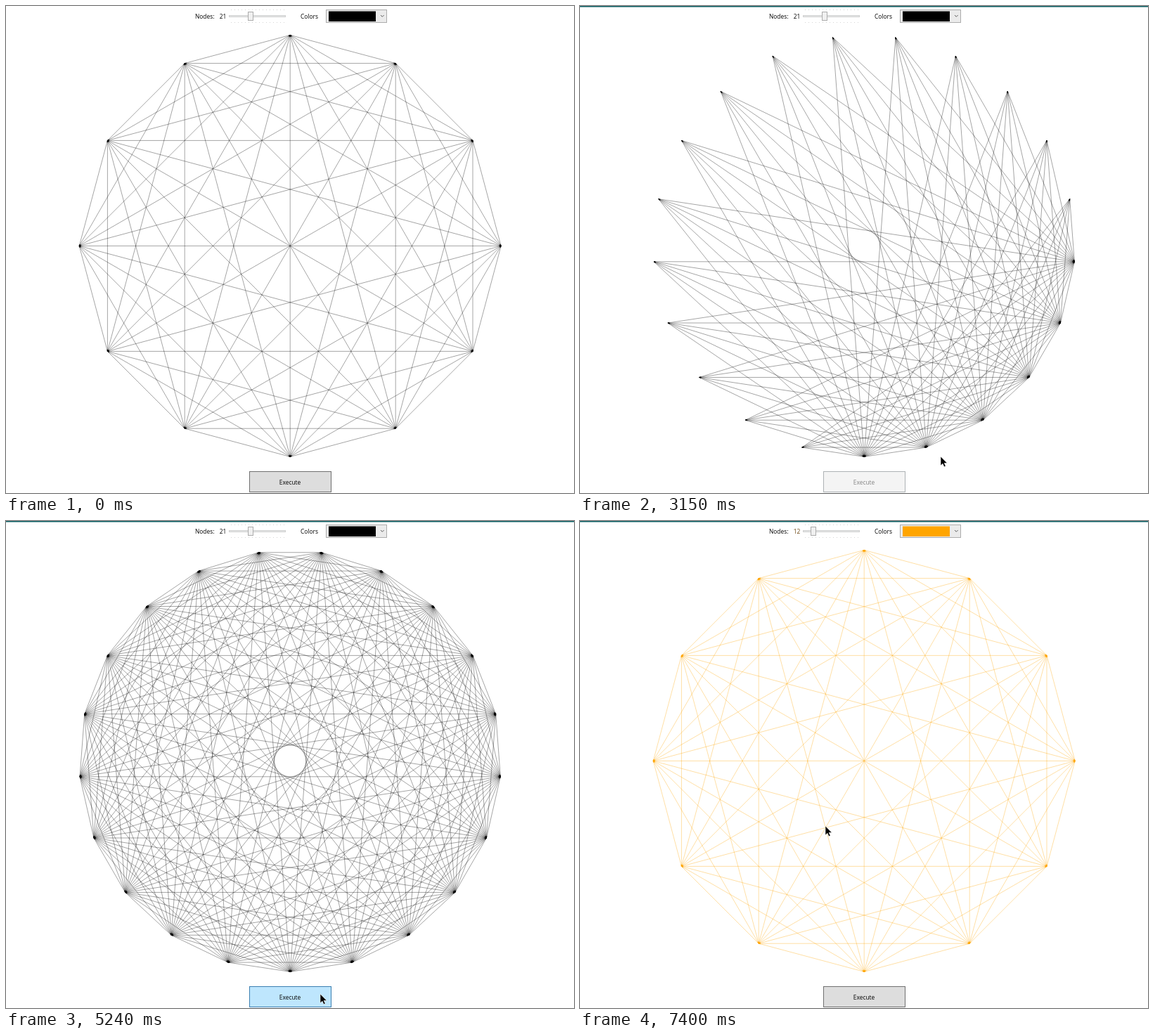
Recreate the animation shown at these times as an HTML page with a canvas. Size 808 by 693 pixels, loop 7570 ms.

```html
<!DOCTYPE html>
<html lang="en">
<head>
<meta charset="utf-8">
<title>Node graph</title>
<style>
html, body { margin: 0; width: 100%; height: 100%; overflow: hidden; background: #fff; }
canvas, svg { position: absolute; left: 0; top: 0; }
text { font: 8.4px "Open Sans", "Noto Sans", sans-serif; }
</style>
</head>
<body>
<canvas id="graph" width="808" height="693"></canvas>
<svg width="808" height="693" viewBox="0 0 808 693">
  <rect id="bar" width="808" height="1.5" fill="#0b5c61"/>
  <text x="269" y="18">Nodes:</text>
  <text id="count" x="303.7" y="18"></text>
  <path d="M320 5.5H396M320 23.5H396" stroke="#d4d4d4" stroke-dasharray="1 4"/>
  <rect x="317.5" y="13.5" width="80" height="2" fill="#e7eaea" stroke="#d0d0d0"/>
  <rect id="thumb" y="8.5" width="7" height="12" fill="#f0f0f0" stroke="#acacac"/>
  <text x="419" y="18">Colors</text>
  <rect x="455.5" y="5.5" width="86" height="18" fill="#ebebeb" stroke="#acacac"/>
  <rect id="swatch" x="459" y="7.5" width="67" height="14.5"/>
  <path d="M533 13l2.3 2.3l2.3-2.3" fill="none" stroke="#606060"/>
  <rect id="button" x="346.5" y="662.5" width="116" height="29"/>
  <text id="label" x="404" y="680.5" text-anchor="middle">Execute</text>
  <path id="cursor" d="M0 0V13L3 10.3L5 14.8L7.2 13.8L5.2 9.5H9.3Z" stroke="#fff" stroke-width=".6"/>
</svg>
<script>
const LOOP = 7570, CUT = 5700, ENTER = 230;
const RUN1 = { n: 21, color: '#000', start: 1380, end: 5240 };
const RUN2 = { n: 12, color: '#ffa500', start: 6050, end: 7400 };
const CX = 404.2, CY = 341.4, R = 300;
const $ = id => document.getElementById(id);
const ctx = $('graph').getContext('2d');

// Pointer moves: start, duration, target x, target y
const origin = [731, 413];
const moves = [
  [ENTER, 690, 258, 636],
  [920, 380, 382, 677],
  [2300, 220, 513, 641],
  [3230, 500, 447, 673],
  [6060, 340, 349, 434]
];

// background, border, text
const looks = {
  normal: ['#ddd', '#707070', '#000'],
  hover: ['#bee6fd', '#3c7fb1', '#000'],
  pressed: ['#c4e5f6', '#2c628b', '#000'],
  disabled: ['#f4f4f4', '#adb2b5', '#838383']
};

const clamp = v => Math.min(1, Math.max(0, v));
const smooth = p => p * p * (3 - 2 * p);

function pointerAt(t) {
  let [x, y] = origin;
  for (const [start, time, toX, toY] of moves) {
    const p = smooth(clamp((t - start) / time));
    x += (toX - x) * p;
    y += (toY - y) * p;
  }
  return [x, y];
}

// Drawing slows down a little as the graph fills
function edgesDrawn({ n, start, end }, t) {
  const p = clamp((t - start) / (end - start));
  return Math.floor(n * (n - 1) / 2 * p * (1.18 - 0.18 * p) + 0.01);
}

function line(x1, y1, x2, y2, width) {
  ctx.lineWidth = width;
  ctx.beginPath();
  ctx.moveTo(x1, y1);
  ctx.lineTo(x2, y2);
  ctx.stroke();
}

// Each edge is a hairline with a short, slightly heavier tip at both ends
function drawEdge(x1, y1, x2, y2) {
  const k = 2.6 / Math.hypot(x2 - x1, y2 - y1);
  const dx = (x2 - x1) * k, dy = (y2 - y1) * k;
  line(x1, y1, x2, y2, 0.36);
  line(x1, y1, x1 + dx, y1 + dy, 0.7);
  line(x2, y2, x2 - dx, y2 - dy, 0.7);
}

function drawGraph(n, count, color) {
  const node = i => {
    const a = 2 * Math.PI * i / n;
    return [CX + R * Math.sin(a), CY + R * Math.cos(a)];
  };
  ctx.clearRect(0, 0, 808, 693);
  ctx.strokeStyle = color;
  for (let i = 0; i < n; i++) {
    for (let j = i + 1; j < n && count > 0; j++, count--) drawEdge(...node(i), ...node(j));
  }
}

function buttonState(t) {
  for (const { start, end } of [RUN1, RUN2]) {
    if (t >= start && t < end) return 'disabled';
    if (t >= start - 80 && t < start) return 'pressed';
  }
  const [x, y] = pointerAt(t);
  return x > 346 && x < 463 && y > 662 ? 'hover' : 'normal';
}

function render(t) {
  const settings = t < CUT ? RUN1 : RUN2;
  if (t < RUN1.start) drawGraph(12, 66, '#000');
  else {
    const run = t < RUN2.start ? RUN1 : RUN2;
    drawGraph(run.n, edgesDrawn(run, t), run.color);
  }

  const [fill, stroke, ink] = looks[buttonState(t)];
  $('button').setAttribute('fill', fill);
  $('button').setAttribute('stroke', stroke);
  $('label').setAttribute('fill', ink);

  $('bar').style.display = t < RUN1.start - 80 ? 'none' : '';
  $('count').textContent = settings.n;
  $('count').setAttribute('fill', t < CUT ? '#000' : '#6b4510');
  $('thumb').setAttribute('x', Math.round(308 + settings.n * 1.7) + 0.5);
  $('swatch').setAttribute('fill', settings.color);

  $('cursor').style.display = t < ENTER ? 'none' : '';
  $('cursor').setAttribute('transform', `translate(${pointerAt(t)})`);
}

const begin = performance.now();
function tick() {
  render((performance.now() - begin) % LOOP);
  requestAnimationFrame(tick);
}
tick();
</script>
</body>
</html>
```
